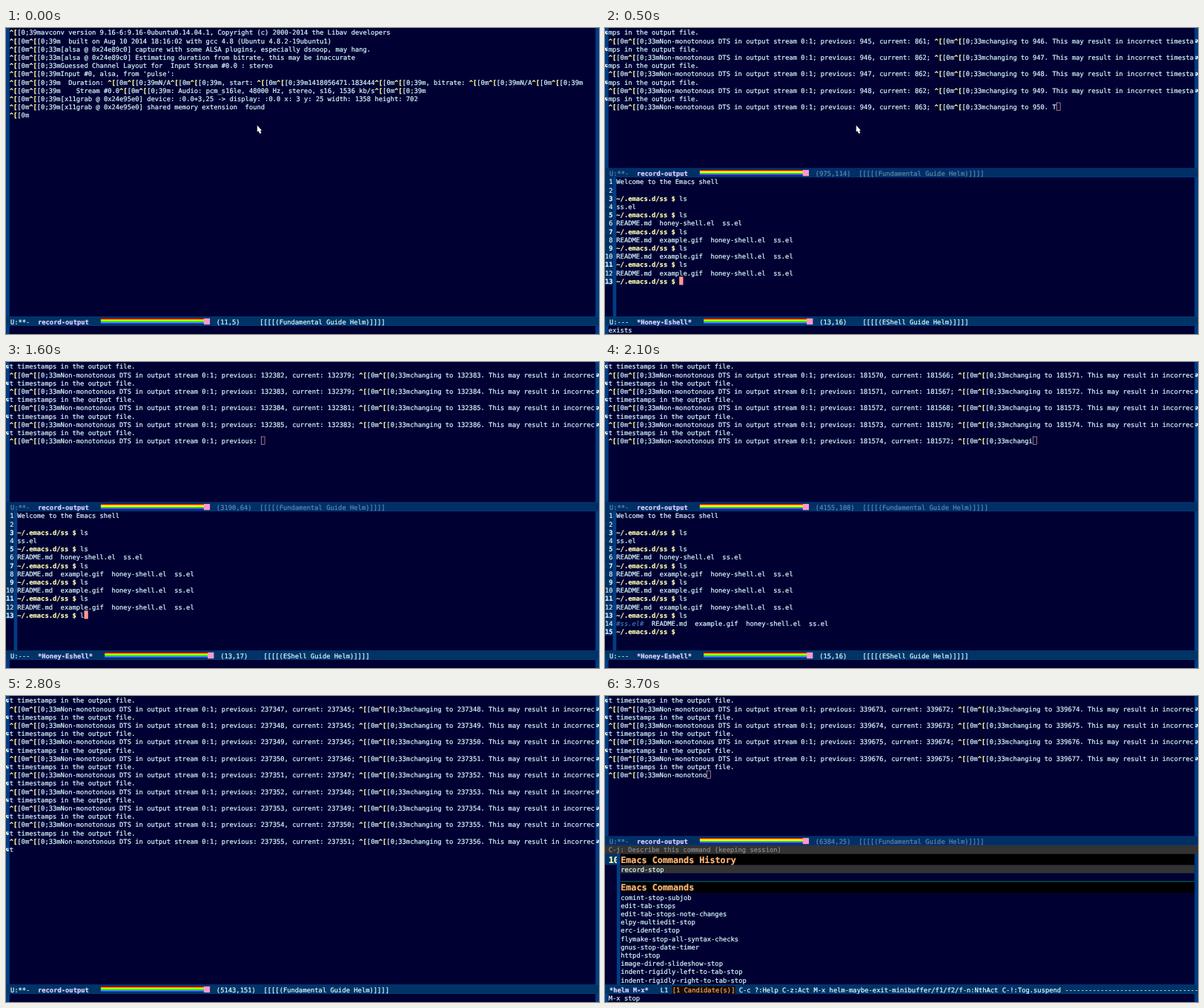
An HTML page that plays this animation: 800x414 px, repeating every 3800 ms.

```html
<!DOCTYPE html>
<html lang="en">
<head>
<meta charset="utf-8">
<title>Editor session</title>
<style>
html, body { margin: 0; width: 100%; height: 100%; overflow: hidden; background: #000033; }
#stage {
  position: absolute; left: 0; top: 0; width: 1358px; height: 703px; overflow: hidden;
  transform: scale(.5891); transform-origin: 0 0;
  background: #000033; color: #dcffff;
  font: 14.95px/22px "DejaVu Sans Mono", "Liberation Mono", monospace;
  text-rendering: geometricPrecision; white-space: pre;
  -webkit-text-stroke: .35px currentColor;
}
#stage div, #stage svg { position: absolute; }
.fringe { background: #003d85; width: 8px; }
.esc { color: #ffff99; font-weight: bold; }
.prompt { color: #ffffb0; font-weight: bold; }
.auto { color: #3a7cab; font-style: italic; }
.num { background: #003366; color: #e6f4ff; text-align: right; height: 19px; }
.cursor { width: 9px; height: 19px; background: #ff9999; }
.hollow { background: none; box-sizing: border-box; border: 1px solid #ffc4c4; }
.mode { left: 0; width: 1356px; height: 19px; background: #003366; border: 1px solid #00488c; color: #dcffff; }
.mode b { color: #e0d4ff; }
.mode.idle { background: #002f66; border-color: #003d85; color: #5f88b4; }
.bar { display: inline-block; position: relative; width: 256px; height: 12px; vertical-align: 1px; }
.bar i { position: absolute; left: 0; top: 0; width: 238px; height: 12px;
  background: linear-gradient(#f00 0 2px, #f90 0 4px, #ff0 0 6px, #3f0 0 8px, #09f 0 10px, #63f 0); }
.bar u { position: absolute; left: 236px; top: 0; width: 14px; height: 14px; background: #ff99cc; }
.count { background: #160c08; color: #ffa860; }
.head { left: 36px; width: 1314px; height: 25px; line-height: 26px; font-size: 19.95px; font-weight: bold; background: #000; color: #ffb878; }
</style>
</head>
<body>
<div id="stage"></div>
<script>
const stage = document.getElementById('stage');
const STEP = 100, LOOP = 3800, ROW = 19, COL = 9, WIDTH = 149;

// time, buffer line, column, timestamp of the last line, lags from newest to oldest
const KEYS = [
  [0, 11, 5, 0, [86]],
  [500, 975, 114, 949, [86, 86, 85, 84, 84]],
  [1000, 2099, 51, 61822, [1]],
  [1600, 3190, 64, 132386, [2, 2, 3, 4, 3]],
  [2100, 4155, 108, 181574, [2, 3, 4, 4, 4]],
  [2800, 5143, 151, 237355, [4, 4, 4, 4, 4, 4, 4, 3, 2]],
  [3700, 6384, 25, 339677, [1]]
];

const A = '^[[0;39m', B = '^[[0m' + A, C = '^[[0m^[[0;33m';
const INTRO = [
  A + 'avconv version 9.16-6:9.16-0ubuntu0.14.04.1, Copyright (c) 2000-2014 the Libav developers',
  B + '  built on Aug 10 2014 18:16:02 with gcc 4.8 (Ubuntu 4.8.2-19ubuntu1)',
  C + '[alsa @ 0x24e89c0] capture with some ALSA plugins, especially dsnoop, may hang.',
  C + '[alsa @ 0x24e89c0] Estimating duration from bitrate, this may be inaccurate',
  C + 'Guessed Channel Layout for  Input Stream #0.0 : stereo',
  B + "Input #0, alsa, from 'pulse':",
  [B + '  Duration: ', 'N/A', ', start: ', '1418056471.183444', ', bitrate: ', 'N/A', ''].join(B),
  [B + '    Stream #0.0', ': Audio: pcm_s16le, 48000 Hz, stereo, s16, 1536 kb/s', ''].join(B),
  B + '[x11grab @ 0x24e95e0] device: :0.0+3,25 -> display: :0.0 x: 3 y: 25 width: 1358 height: 702',
  B + '[x11grab @ 0x24e95e0] shared memory extension  found',
  '^[[0m'
];
const COMMANDS = ['comint-stop-subjob', 'edit-tab-stops', 'edit-tab-stops-note-changes',
  'elpy-multiedit-stop', 'erc-identd-stop', 'flymake-stop-all-syntax-checks',
  'gnus-stop-date-timer', 'httpd-stop', 'image-dired-slideshow-stop',
  'indent-rigidly-left-to-tab-stop', 'indent-rigidly-right-to-tab-stop'];

const box = (cls, x, y, w, h, style = '') =>
  `<div class="${cls}" style="left:${x}px;top:${y}px;width:${w}px;height:${h}px;${style}"></div>`;
const text = (x, y, html) => `<div style="left:${x}px;top:${y}px">${html}</div>`;
const cursor = (x, y, hollow) => `<div class="cursor ${hollow ? 'hollow' : ''}" style="left:${x}px;top:${y}px"></div>`;
const paint = s => s.replace(/\^\[/g, '<span class="esc">^[</span>');

const CURL = 'M2 0h4v2h-4v1h1v1h2v-1h1v5h-5v-1h1v-1h-1v-1h-1v-4h1v-1h1z';
const curl = (x, y, flip) =>
  `<svg width="8" height="8" style="left:${x}px;top:${y + 7}px"><path fill="#f2fbff" d="${CURL}"${
    flip ? ' transform="matrix(-1 0 0 1 8 0)"' : ''}/></svg>`;

function logState(t) {
  let i = KEYS.length - 1;
  while (KEYS[i][0] > t) i--;
  const a = KEYS[i], b = KEYS[i + 1];
  if (a[0] === t || !b) return { line: a[1], col: a[2], stamp: a[3], lags: a[4] };
  const k = (t - a[0]) / (b[0] - a[0]);
  const mix = n => Math.round(a[n] + (b[n] - a[n]) * k);
  return { line: mix(1), col: 13 + (t / STEP * 67) % 138, stamp: mix(3), lags: a[4] };
}

function entry(p, lag) {
  return `${C}Non-monotonous DTS in output stream 0:1; previous: ${p}, current: ${Math.max(0, p - lag)}; ` +
    `${C}changing to ${p + 1}. This may result in incorrect timestamps in the output file.`;
}

// Visual rows of the log, with the row being written at index `last`
function logRows(s, last) {
  if (s.line === INTRO.length) return INTRO.map(str => ({ str }));
  const rows = [];
  for (let i = 0; rows.length <= last; i++) {
    let str = entry(s.stamp - i, s.lags[Math.min(i, s.lags.length - 1)]);
    if (!i) str = str.slice(0, s.col);
    if (str.length > WIDTH) rows.unshift({ str: str.slice(0, WIDTH), wraps: true }, { str: str.slice(WIDTH), cont: true });
    else rows.unshift({ str });
  }
  return rows.slice(-last - 1);
}

function logPane(s, last, hollow, blink) {
  const rows = logRows(s, last);
  let out = rows.map((r, i) => text(8, i * ROW, paint(r.str)) +
    (r.cont ? curl(0, i * ROW) : '') + (r.wraps ? curl(1350, i * ROW, true) : '')).join('');
  const end = rows.length - 1;
  if (hollow || blink) out += cursor(8 + rows[end].str.length * COL, end * ROW, hollow);
  return out;
}

const modeLine = (y, html, idle) => `<div class="mode ${idle ? 'idle' : ''}" style="top:${y}px">${html}</div>`;
const status = (flags, name, line, col, mode) =>
  ` U:${flags}  <b>${name}</b>   <span class="bar"><i></i><u></u></span> ` +
  `${`(${line},${col})`.padEnd(9)}  [[[[(${mode} Guide Helm)]]]]`;

function shellPane(t, blink) {
  const some = 'README.md  honey-shell.el  ss.el';
  const all = 'README.md  example.gif  honey-shell.el  ss.el';
  const prompt = '<span class="prompt">~/.emacs.d/ss $ </span>';
  const done = t >= 1800;
  const typed = done || t < 1600 ? '' : t < 1700 ? 'l' : 'ls';
  const lines = ['Welcome to the Emacs shell', ''];
  const listings = ['ss.el', some, all, all, all];
  if (done) listings.push('<span class="auto">#ss.el#</span>  ' + all);
  listings.forEach(l => lines.push(prompt + 'ls', l));
  lines.push(prompt + typed);
  const y = i => 343 + i * ROW, n = lines.length, col = 16 + typed.length;
  return box('fringe', 18, 343, 8, 320) +
    lines.map((l, i) => `<div class="num" style="left:0;width:18px;top:${y(i)}px;${
      l.startsWith(prompt) ? 'font-weight:bold' : ''}">${i + 1}</div>` + text(26, y(i), l)).join('') +
    (blink ? cursor(26 + col * COL, y(n - 1)) : '') +
    modeLine(663, status('---', '*Honey-Eshell*', n, col, 'EShell'));
}

function helmPane() {
  const head = (y, s) => `<div class="head" style="top:${y}px">${s}</div>`;
  const bar = ' <b>*helm M-x*</b>   L1 <span class="count">[1 Candidate(s)]</span> C-c ?:Help C-z:Act M-x ' +
    'helm-maybe-exit-minibuffer/f1/f2/f-n:NthAct C-!:Tog.suspend ' + '-'.repeat(36);
  return box('fringe', 27, 363, 8, 300) +
    box('', 0, 343, 1358, 20, 'background:#333') +
    `<div style="left:8px;top:343px;color:#8c8c8c">C-j: Describe this command (keeping session)</div>` +
    '<div class="num" style="left:0;width:27px;height:25px;overflow:hidden;text-align:left;text-indent:8px;' +
    'font-size:19.95px;font-weight:bold;line-height:26px;color:#ffffb0;top:363px">10</div>' +
    head(363, 'Emacs Commands History') +
    box('', 36, 388, 1314, 19, 'background:#333') + text(36, 388, 'record-stop') +
    head(427, 'Emacs Commands') + box('', 36, 425, 1314, 2, 'background:#00664a') +
    COMMANDS.map((c, i) => text(36, 452 + i * ROW, c)).join('') +
    modeLine(663, bar);
}

function draw(t) {
  const shell = (t >= 400 && t < 800) || (t >= 1400 && t < 2600);
  const helm = t >= 3300, split = shell || helm;
  const blink = (t / STEP) % 7 !== 0;
  const s = logState(t);
  let out = box('fringe', 0, 0, 8, split ? 322 : 663) + box('fringe', 1350, 0, 8, 703) +
    box('fringe', 0, 684, 8, 19);
  out += logPane(s, split ? 9 : 18, split, blink);
  out += modeLine(split ? 322 : 663, status('**-', 'record-output', s.line, s.col, 'Fundamental'), split);
  if (shell) out += shellPane(t, blink);
  if (helm) out += helmPane();

  let echo = '';
  if (shell && t < 1600) echo = 'exists';
  if (helm) echo = 'M-x ' + 'stop'.slice(0, (t - 3300) / STEP);
  out += text(8, 684, echo);

  if (t < 1300) {
    out += '<svg width="16" height="24" style="left:573px;top:222px"><path d="M2 1L2 17L5 15L8 21L12 19L10 14L13 13Z" ' +
      'fill="#fff" stroke="#111" stroke-width=".8"/></svg>';
  }
  stage.innerHTML = out;
}

let shown = -1;
function tick() {
  const t = Math.floor(performance.now() % LOOP / STEP) * STEP;
  if (t !== shown) draw(shown = t);
  requestAnimationFrame(tick);
}
tick();
</script>
</body>
</html>
```
